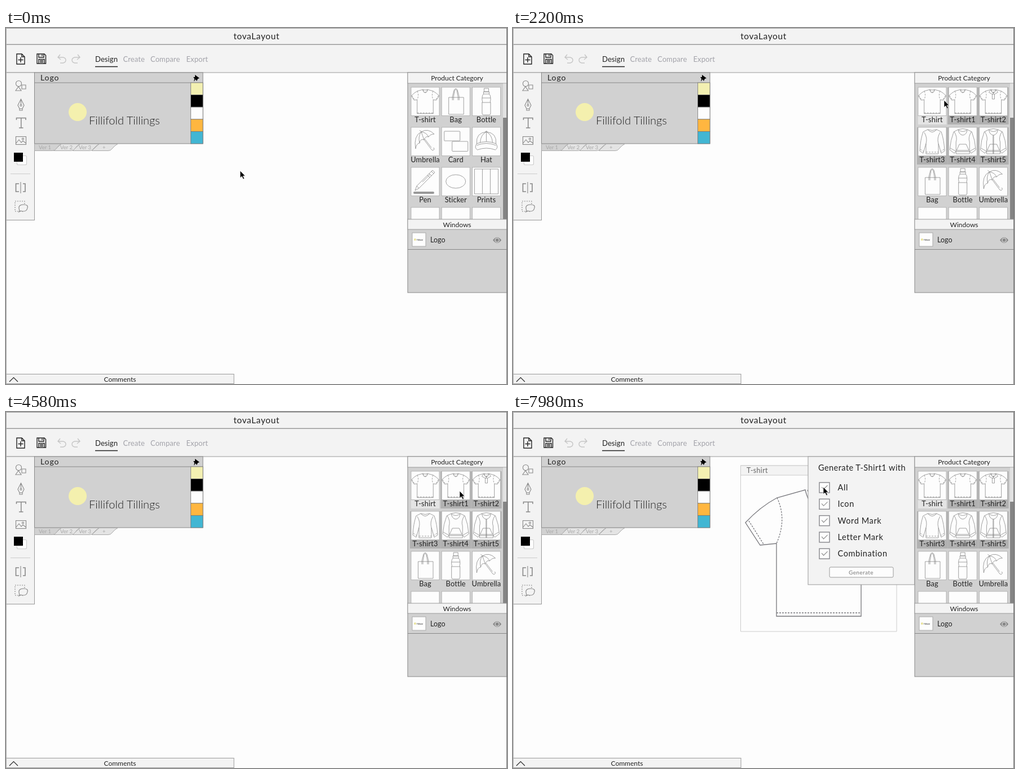
These frames come from a looping animation (888 px wide and 631 px high, 8 s). An HTML page:

```html
<!DOCTYPE html>
<html lang="en">
<head>
<meta charset="utf-8">
<title>Design workspace</title>
<style>
  html, body { margin: 0; width: 100%; height: 100%; overflow: hidden; background: #fdfdfd; }
  svg { display: block; width: 888px; height: 631px; }
  path { vector-effect: non-scaling-stroke; }
  text { font-family: Lato, "Open Sans", sans-serif; font-size: 13px; fill: #222; }
  .mid { text-anchor: middle; }
  .line { fill: none; stroke: #888; stroke-width: 1.1; }
  .ink { fill: none; stroke: #222; stroke-width: 1.4; }
  .bar { fill: #f3f3f3; stroke: #999; }
  .panel { fill: #d1d1d1; stroke: #888; }
  .icon { fill: none; stroke: #808080; stroke-width: .75; }
  .shirt { fill: #fdfdfd; stroke: #77777c; stroke-width: 1.3; }
  .dash { fill: none; stroke-dasharray: 3 2; }
  .option { font-size: 14.5px; letter-spacing: .6px; }
</style>
</head>
<body>
<svg viewBox="0 0 888 631">
  <defs>
    <clipPath id="gridClip"><rect x="712" y="98" width="169" height="241"/></clipPath>
    <g id="tee">
      <path d="M-24 -112L-74 -98Q-104 -82 -130 -54L-104 -14L-75 -17V112H75V-17L104 -14L130 -54Q104 -82 74 -98L24 -112Q0 -104 -24 -112Z"/>
      <path d="M-24 -112Q-17 -82 0 -82T24 -112"/>
      <path class="dash" d="M-74 -98Q-56 -60 -75 -17M74 -98Q56 -60 75 -17M-124 -57L-98 -16M124 -57L98 -16M-75 106H75M-20 -112Q-14 -88 0 -88T20 -112"/>
    </g>
    <g id="longSleeve">
      <path d="M17 4L9 8Q4 22 3 42L9 46L14 29V47H36V29L41 46L47 42Q46 22 41 8L33 4Q25 7 17 4Z"/>
      <path d="M17 4Q25 13 33 4M14 29Q17 19 11 9M36 29Q33 19 39 9"/>
      <path class="dash" d="M4 39L10 43M46 39L40 43M14 44H36"/>
    </g>
    <g id="hoodie">
      <path d="M17 4L9 8Q3 23 2 40L10 46L13 42V47H37V42L40 46L48 40Q47 23 41 8L33 4Q25 1 17 4Z"/>
      <path d="M17 4Q18 13 25 14Q32 13 33 4M18 5Q25 10 32 5M13 42V26Q16 18 10 8M37 42V26Q34 18 40 8M13 43H37M3 37L12 42M47 37L38 42M19 30H31L36 41H14Z"/>
    </g>
  </defs>

  <rect class="bar" x=".5" y=".5" width="887" height="28.5"/>
  <rect class="bar" x=".5" y="29.5" width="887" height="49.5"/>
  <text class="mid" x="444" y="20" style="font-size:15.5px;letter-spacing:.6px">tovaLayout</text>
  <path class="ink" d="M19 46H28L33 51V64H19ZM28 46V51H33M26 52V61M21.5 56.5H30.5"/>
  <path class="ink" d="M55 46H68L70.5 48.5V63H55ZM58 46V52H67V46M64 47V50M58 63V55.5H68V63M60 58H66M60 60.5H66"/>
  <path class="line" style="stroke:#c6c6c6;stroke-width:1.4" d="M96 47L92 52L97 56M92 52H101Q106 53 106 57T101 62H96M127 47L131 52L126 56M131 52H122Q117 53 117 57T122 62H127"/>
  <g id="tabs"></g>
  <path d="M158 68.5H198" stroke="#222" stroke-width="1.3"/>

  <rect class="bar" x=".5" y="79" width="50" height="261.5"/>
  <g class="line">
    <circle cx="22.5" cy="98.5" r="5"/><path d="M28 101H35V108H28ZM17 111L22 104L27 111Z" fill="#f3f3f3"/>
    <path d="M26.5 126L21 137L24 143H29L32 137ZM26.5 126V136M24 143V146H29V143"/><circle cx="26.5" cy="137" r="1.5"/>
    <path d="M18.5 163V159.5H35V163M26.8 159.5V177M23 177H30.5" stroke-width="1.5"/>
    <rect x="17.5" y="192.5" width="18" height="14"/><path d="M18 204L23 198L27 203L30 200L35 204"/><circle cx="30" cy="196.5" r="1.5"/>
    <rect x="19.5" y="226.5" width="17" height="16" rx="2" fill="#fdfdfd" stroke="#ccc"/>
    <rect x="14" y="221" width="16" height="16" fill="#000" stroke="none"/>
    <path d="M8 258.5H43" stroke="#ccc"/>
    <path d="M23 276H17.5V290H23M30 276H34V290H30" stroke-width="1.6"/><path d="M26 273V293"/>
    <path d="M30 325H16V307H33V312" stroke-dasharray="2 2"/>
    <path d="M24 324L23 320Q22 313 31 313T38 319Q37 325 30 325L26 324L23 326Z" fill="#f3f3f3"/>
  </g>

  <rect class="panel" x="50.5" y="79" width="298.5" height="126"/>
  <path class="line" d="M51 97H349"/>
  <text x="61" y="93" style="font-size:14px;letter-spacing:.9px">Logo</text>
  <path d="M335 83L343 89L340 90L338 94L336 91L333 95L334 90L332 87L335 87Z"/>
  <circle cx="127" cy="149" r="16" fill="#f4f0ae"/>
  <text x="147" y="171" style="font-size:20px;font-weight:300">Fillifold Tillings</text>
  <g id="swatches" stroke="#777" stroke-width=".8"></g>
  <g fill="#e4e4e4" stroke="#aaa">
    <path d="M165 205.5H198Q193 208 188 214Q186 217.5 181 217.5H152Z"/>
    <path d="M131 205.5H165Q160 208 155 214Q153 217.5 148 217.5H118Z"/>
    <path d="M98 205.5H131Q126 208 122 214Q120 217.5 115 217.5H84Z"/>
    <path d="M50.5 205.5H98Q93 208 89 214Q87 217.5 82 217.5H50.5Z" fill="#d1d1d1"/>
  </g>
  <g id="versions"></g>

  <g id="result" visibility="hidden">
    <path d="M403.5 95V389H680V95Z" fill="#fdfdfd" stroke="#ccc"/>
    <rect x="403.5" y="95" width="276" height="17" fill="#f3f3f3" stroke="#ccc"/>
    <text x="414" y="108" style="letter-spacing:.3px;font-size:12.5px;fill:#666">T-shirt</text>
    <use href="#tee" class="shirt" transform="translate(542 250)"/>
    <rect class="bar" x="523" y="79" width="189" height="227"/>
    <text x="541" y="104" style="font-size:14.5px;letter-spacing:.45px">Generate T-Shirt1 with</text>
    <g id="options"></g>
    <rect x="561" y="275" width="113" height="18" rx="2" fill="#fdfdfd" stroke="#999"/>
    <text class="mid" x="617" y="287.5" style="font-size:10px;letter-spacing:.4px;fill:#777">Generate</text>
  </g>

  <rect class="panel" x="712" y="79" width="175.5" height="390"/>
  <rect class="bar" x="712" y="79" width="175.5" height="19"/>
  <text class="mid" x="799.5" y="92.5" style="font-size:12px">Product Category</text>
  <rect x="881" y="98.5" width="6" height="61" fill="#e2e2e2"/>
  <rect x="881" y="159" width="6" height="180" fill="#858585"/>
  <g clip-path="url(#gridClip)"><g id="collapsed"></g><g id="expanded"></g></g>
  <rect class="bar" x="712" y="339" width="175.5" height="18"/>
  <text class="mid" x="799.5" y="352.5" style="font-size:12px">Windows</text>
  <path class="line" d="M712 392.5H887"/>
  <rect x="720" y="363" width="24" height="24" fill="#fdfdfd" stroke="#aaa"/>
  <circle cx="725" cy="375" r="2" fill="#e8e29a"/>
  <text x="728" y="377" style="font-size:3.4px">Fillifold</text>
  <text x="752" y="380" style="font-size:12.5px">Logo</text>
  <path d="M863 376Q870.5 366 878 376Q870.5 386 863 376Z" fill="#888"/>
  <circle cx="870.5" cy="376" r="3.6" fill="#888" stroke="#d8d8d8" stroke-width="1.3"/>

  <rect class="bar" x=".5" y="613.5" width="403.5" height="17"/>
  <path class="ink" style="stroke-width:1.1" d="M6 627L13.5 619.5L21 627"/>
  <text class="mid" x="202" y="626.5" style="font-size:12px">Comments</text>
  <path d="M.5 0V631" stroke="#aaa"/>
  <path d="M887.5 0V631" stroke="#777"/>

  <path id="cursor" d="M0 0V12.5L3 10L5.5 15L7.5 14L5.2 9.2H9Z" fill="#000" stroke="#fff" stroke-width=".7"/>
</svg>
<script>
const byId = id => document.getElementById(id);
const fill = (id, items, draw) => { byId(id).innerHTML = items.map(draw).join(""); };
const path = d => `<path d="${d}"/>`;
const tee = '<use href="#tee" transform="translate(25 25.5) scale(.19)"/>';
const hoodie = '<use href="#hoodie"/>';

// Product drawings in a 50 by 50 box.
const art = {
  "T-shirt": tee,
  "T-shirt1": tee,
  "T-shirt2": tee + path("M20 5L17 9L24 13L25 9L26 13L33 9L30 5M23 13V21H27V13"),
  "T-shirt3": '<use href="#longSleeve"/>',
  "T-shirt4": hoodie,
  "T-shirt5": hoodie + path("M24.5 14V47M25.5 14V47"),
  Bag: path("M12.5 18H39V48H12.5ZM19 23V17L22 5Q25 0 28 5L31 17V23M21 23V17L23 6Q25 2 27 6L29 17V23"),
  Bottle: path("M21 2H29V8H21ZM20 8H30V12H20ZM20 12Q17.5 14 17.5 19V23Q19 25 17.5 27V46Q17.5 49 20 49H30Q32.5 49 32.5 46V27Q31 25 32.5 23V19Q32.5 14 30 12M17.5 19H32.5M17.5 27H32.5"),
  Umbrella: path("M8 38Q4 15 18 8Q30 1 41 12Q34 12 31 17Q26 15 23 22Q16 20 15 28Q9 29 8 38ZM18 8Q12 16 15 28M18 8Q20 14 23 22M18 8Q27 9 31 17M15 5L18 8M23 22L35 38Q38 43 41 39L40 36M24.5 21L36 36"),
  Card: '<rect x="4.5" y="7" width="28" height="17" rx="1"/><rect x="18.5" y="25" width="28" height="17.5" rx="1"/>',
  Hat: path("M8 29Q6 10 25 8Q44 10 42 29Q25 22 8 29ZM8 29Q3 36 9 40Q25 34 41 40Q47 36 42 29M8 32Q25 25 42 32M25 8V25M25 8Q15 13 14 27M25 8Q35 13 36 27M23 8Q25 5 27 8"),
  Pen: '<path d="M6 45H39" stroke="#999" stroke-width="4" stroke-linecap="round"/>' +
    path("M38 5L42 9L14 37L7 41L10 33ZM10 33L14 37M32 11L36 15M29 14L33 18M36 7L40 11M34 12L20 26"),
  Sticker: '<ellipse cx="25" cy="25" rx="17.5" ry="12"/>',
  Prints: path("M4 3H46V47H4ZM18 3V47M32 3V47")
};

// The first open group shades its six tiles; its heading gets a light label.
function shade(index) {
  return index
    ? '<rect x="-2" width="54.2" height="66" fill="#b1b1b1"/>'
    : '<rect y="50" width="50" height="16" fill="#e4e4e4"/>';
}
function tile(name, index, open) {
  const x = 718 + index % 3 * 54.2, y = 105 + Math.floor(index / 3) * 71;
  return `<g transform="translate(${x} ${y})">
    ${open && index < 6 ? shade(index) : ""}
    <rect width="50" height="50.5" fill="#fdfdfd" stroke="#aaa" stroke-width=".8"/>
    <g class="icon">${art[name] || ""}</g>
    <text class="mid" x="25" y="62" style="font-size:12.8px;letter-spacing:.15px">${name}</text></g>`;
}
const blanks = ["", "", ""];
fill("collapsed", ["T-shirt", "Bag", "Bottle", "Umbrella", "Card", "Hat", "Pen", "Sticker", "Prints", ...blanks],
  (name, i) => tile(name, i, false));
fill("expanded", ["T-shirt", "T-shirt1", "T-shirt2", "T-shirt3", "T-shirt4", "T-shirt5", "Bag", "Bottle", "Umbrella", ...blanks],
  (name, i) => tile(name, i, true));

fill("tabs", [["Design", 158], ["Create", 207.5], ["Compare", 256], ["Export", 319.5]],
  ([name, x], i) => `<text x="${x}" y="60" style="letter-spacing:.1px;fill:${i ? "#a3a3aa" : "#222"}">${name}</text>`);
fill("versions", [["Ver 1", 58], ["Ver 2", 96], ["Ver 3", 129], ["+", 171]],
  ([name, x]) => `<text x="${x}" y="215" style="font-size:9.5px;fill:#aaa">${name}</text>`);
fill("swatches", ["#f3f0b2", "#000", "#fdfdfd", "#ffb640", "#42b6d3"],
  (color, i) => `<rect x="327.5" y="${97 + i * 21.6}" width="21.5" height="21.6" fill="${color}"/>`);
fill("options", ["All", "Icon", "Word Mark", "Letter Mark", "Combination"], (name, i) => {
  const y = 134 + i * 29.3;
  return `<rect x="543" y="${y - 9}" width="18" height="18" fill="#fdfdfd" stroke="#85858a" stroke-width="1.4"/>
    <path class="check line" d="M547 ${y - 1}L550.5 ${y + 3}L557.5 ${y - 4}"/>
    <text class="option" x="575.5" y="${y + 5}">${name}</text>`;
});

const LOOP = 8000, EXPAND = 1800, OPEN = 4900, CHECK = 7100;
const moves = [
  [0, 415, 253], [1560, 735, 126], [1800, 735, 126], [2200, 764, 128], [2700, 764, 128],
  [3240, 772, 142], [3500, 772, 142], [4300, 804, 140], [5200, 804, 140], [6400, 550, 133], [LOOP, 550, 133]
];
const checks = document.querySelectorAll(".check");
const show = (node, on) => node.setAttribute("visibility", on ? "visible" : "hidden");

function cursorAt(time) {
  const next = moves.findIndex(move => move[0] > time);
  const [t0, x0, y0] = moves[next - 1], [t1, x1, y1] = moves[next];
  const p = (time - t0) / (t1 - t0), eased = p * p * (3 - 2 * p);
  return [x0 + (x1 - x0) * eased, y0 + (y1 - y0) * eased];
}

function render(now) {
  const time = now % LOOP;
  show(byId("collapsed"), time < EXPAND);
  show(byId("expanded"), time >= EXPAND);
  show(byId("result"), time >= OPEN);
  checks.forEach(check => show(check, time >= CHECK));
  byId("cursor").setAttribute("transform", `translate(${cursorAt(time)})`);
}

const start = performance.now();
function tick() {
  render(performance.now() - start);
  requestAnimationFrame(tick);
}
tick();
</script>
</body>
</html>
```
